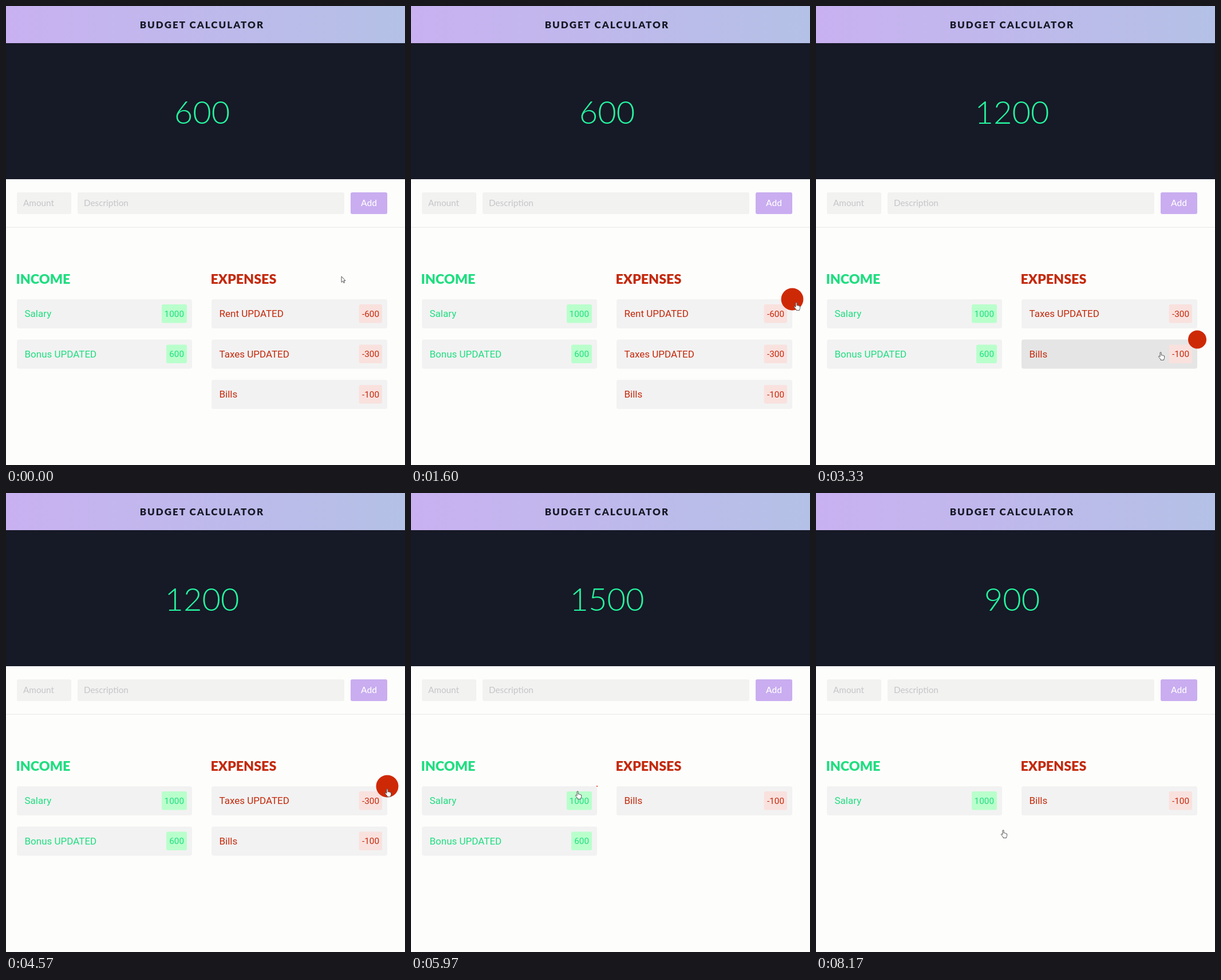
Animation, 697 px wide and 803 px high, one loop 8210 ms. Source, as an HTML page:

```html
<!DOCTYPE html>
<html lang="en">
<head>
<meta charset="utf-8">
<title>Budget calculator</title>
<style>
  html, body { margin: 0; width: 100%; height: 100%; overflow: hidden; background: #fdfdfc; }
  svg { display: block; }
  text { font-family: Lato, sans-serif; }
  .title { font-size: 17px; font-weight: 900; letter-spacing: 2px; fill: #161926; }
  .balance { font-size: 56px; font-weight: 300; text-anchor: middle; fill: #24f8a0; }
  .field { fill: #f2f2f1; }
  .hint { font-size: 15.3px; fill: #c6c6c9; }
  .button { fill: #c9adf0; }
  .add { font-size: 15.5px; font-weight: 500; text-anchor: middle; fill: #fff; }
  .head { font-size: 23.3px; font-weight: 900; }
  .item text { font-family: Roboto, sans-serif; font-size: 17px; }
  .item .sum { font-size: 15.3px; text-anchor: end; }
  .income { fill: #1fde80; }
  .expense { fill: #c4290b; }
  .income .chip { fill: #b9ffcc; }
  .expense .chip { fill: #f9e1de; }
  .dot { fill: #ce2906; }
  .pointer { fill: #fff; stroke: #555; stroke-width: 1; stroke-linejoin: round; }
</style>
</head>
<body>
<svg id="stage" width="697" height="803" viewBox="0 0 697 803">
  <defs>
    <linearGradient id="bar">
      <stop offset="0" stop-color="#c9b1f1"/>
      <stop offset="1" stop-color="#b4c1e6"/>
    </linearGradient>
  </defs>
  <rect width="697" height="803" fill="#fdfdfc"/>
  <rect width="697" height="65" fill="url(#bar)"/>
  <text class="title" x="233.7" y="38.7">BUDGET CALCULATOR</text>
  <rect y="65" width="697" height="238" fill="#161926"/>
  <text class="balance" id="balance" x="342.5" y="206"></text>

  <rect y="386.5" width="697" height="1.5" fill="#eeeeec"/>
  <rect class="field" x="19" y="326" width="95" height="38" rx="3"/>
  <rect class="field" x="125" y="326" width="466" height="38" rx="3"/>
  <rect class="button" x="602" y="326" width="64" height="38" rx="3"/>
  <text class="hint" x="30" y="350">Amount</text>
  <text class="hint" x="136" y="350">Description</text>
  <text class="add" x="634" y="350">Add</text>

  <text class="head income" x="17.5" y="485.5">INCOME</text>
  <text class="head expense" x="357.5" y="485.5">EXPENSES</text>
  <g id="items"></g>
  <g id="cursor">
    <path class="pointer" id="arrow" d="M0 0V10.4L2.4 8.2L4 11.6L5.6 10.8L4 7.6H7Z"/>
    <path class="pointer" id="hand" d="M-1 0.9Q-1 -.3 0 -.3Q1.1 -.3 1.1 .9V5Q2.4 4.2 3 5.2Q4.4 4.6 4.9 5.8Q6.6 5.5 6.6 7V9.4Q6.6 11 5.6 12V13.4H0V12Q-2.2 9.8 -3.6 7.6Q-3.6 6 -2.2 6.5L-1 7.7Z"/>
  </g>
</svg>
<script>
const LOOP = 8210, FADE = 200;
const IDLE = 0, ROW = 1, DOT = 2;
const RADIUS = [0, 16, 19.5], SHADE = [0, 1, 0];
const $ = id => document.getElementById(id);

// hover: [time, state]; gone: time of deletion
const items = [
  { kind: 'income', name: 'Salary', sum: 1000, hover: [[5940, ROW], [6190, IDLE]] },
  { kind: 'income', name: 'Bonus UPDATED', sum: 600, gone: 7480, hover: [[6250, ROW], [7120, DOT]] },
  { kind: 'expense', name: 'Rent UPDATED', sum: -600, gone: 1750, hover: [[560, ROW], [1420, DOT]] },
  { kind: 'expense', name: 'Taxes UPDATED', sum: -300, gone: 4800,
    hover: [[2620, ROW], [2850, IDLE], [3720, ROW], [4260, DOT]] },
  { kind: 'expense', name: 'Bills', sum: -100, hover: [[2950, ROW], [3660, IDLE]] }
];

// time, x, y of the cursor's tip
const path = [
  [0, 586, 473], [150, 586, 473], [800, 606, 538], [1050, 606, 538],
  [1550, 673, 519], [2500, 673, 519], [3100, 602, 606], [3450, 602, 606],
  [3900, 632, 538], [4400, 666, 518], [5050, 666, 518], [5450, 580, 496],
  [5900, 302, 507], [5970, 291, 522], [6420, 253, 605], [6750, 253, 605],
  [7250, 327, 590], [LOOP, 327, 590]
];
const arrowTimes = [[0, 560], [2850, 2950], [3660, 3720], [5150, 5940], [6190, 6250]];

const mix = (a, b, k) => a + (b - a) * k;
const ease = k => { k = Math.max(0, Math.min(1, k)); return k * k * (3 - 2 * k); };

function add(parent, tag, attrs, text = '') {
  const el = document.createElementNS('http://www.w3.org/2000/svg', tag);
  for (const key in attrs) el.setAttribute(key, attrs[key]);
  el.textContent = text;
  return parent.appendChild(el);
}

function build(item) {
  const left = item.kind === 'income' ? 19 : 359;
  const width = item.kind === 'income' ? 306 : 307;
  const chip = item.sum < 0 ? 40.5 : item.sum < 1000 ? 36 : 44;
  const end = left + width - 9;
  const g = add($('items'), 'g', { class: 'item ' + item.kind });
  item.el = g;
  item.box = add(g, 'rect', { x: left, width, height: 51, rx: 4 });
  add(g, 'rect', { class: 'chip', x: end - chip, y: 9, width: chip, height: 32.5, rx: 3 });
  add(g, 'text', { x: left + 13.5, y: 31.3 }, item.name);
  add(g, 'text', { class: 'sum', x: end - 5, y: 30.8 }, item.sum);
  item.dot = add(g, 'circle', { class: 'dot', cx: left + width, cy: 0 });
}

function hoverValue(item, targets, t) {
  let value = targets[IDLE];
  for (const [start, state] of item.hover)
    if (t >= start) value = mix(value, targets[state], ease((t - start) / FADE));
  return value;
}

function cursorAt(t) {
  const i = path.findIndex(p => p[0] > t);
  const [a, b] = [path[i - 1], path[i]];
  const k = ease((t - a[0]) / (b[0] - a[0]));
  return [mix(a[1], b[1], k), mix(a[2], b[2], k)];
}

function draw(t) {
  const count = { income: 0, expense: 0 };
  let total = 0;
  for (const item of items) {
    const shown = !(t >= item.gone);
    item.el.style.display = shown ? '' : 'none';
    if (!shown) continue;
    total += item.sum;
    item.el.setAttribute('transform', `translate(0 ${513 + 70.5 * count[item.kind]++})`);
    const grey = Math.round(mix(242, 229, hoverValue(item, SHADE, t)));
    item.box.setAttribute('fill', `rgb(${grey},${grey},${grey})`);
    item.dot.setAttribute('r', hoverValue(item, RADIUS, t));
  }
  $('balance').textContent = total;

  const arrow = arrowTimes.some(([from, to]) => t >= from && t < to);
  $('arrow').style.display = arrow ? '' : 'none';
  $('hand').style.display = arrow ? 'none' : '';
  $('cursor').setAttribute('transform', `translate(${cursorAt(t)})`);
}

items.forEach(build);
const begin = performance.now();
function tick() {
  draw((performance.now() - begin) % LOOP);
  requestAnimationFrame(tick);
}
tick();
</script>
</body>
</html>
```
